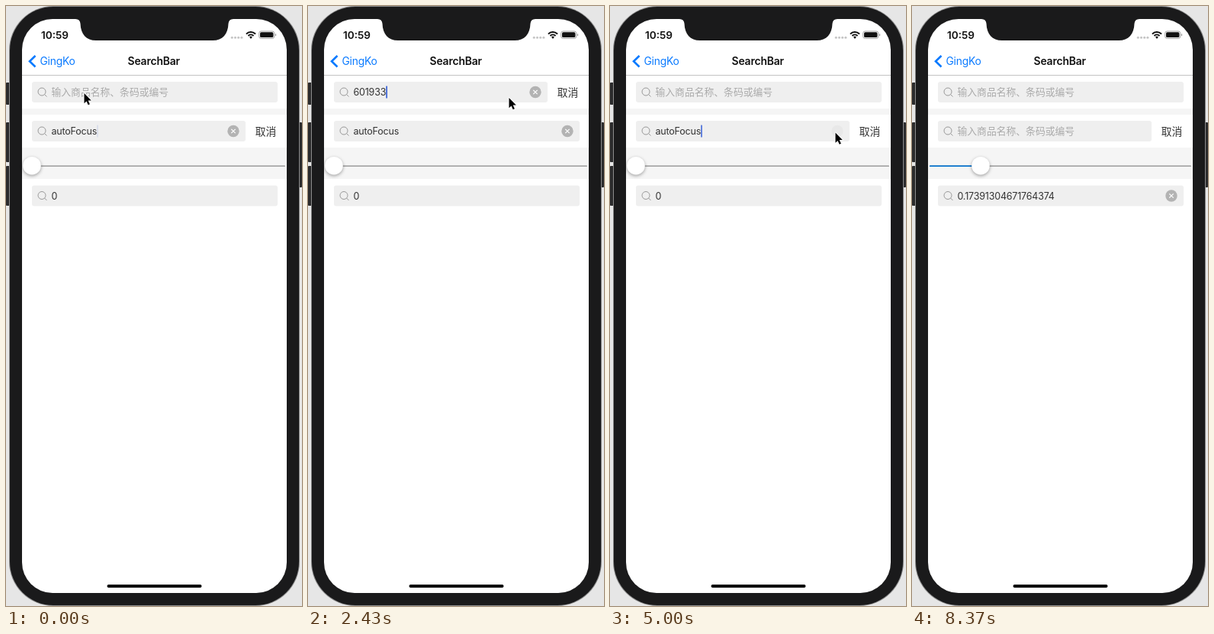
An HTML page with a canvas for the animation above (8430 ms loop, 388 by 784 pixels).

```html
<!DOCTYPE html>
<html lang="zh">
<head>
<meta charset="utf-8">
<style>
  html, body { margin: 0; height: 100%; overflow: hidden; background: #e6e6e6; }
  canvas { display: block; width: 388px; height: 784px; }
</style>
</head>
<body>
<canvas id="stage"></canvas>
<script>
const LOOP = 8430;
const BODY = '#1a1a1b', GREY = '#f5f5f5', FIELD = '#efefef', BLUE = '#0a7aff';
const LATIN = 'Inter, "Noto Sans CJK SC", "Noto Sans CJK", sans-serif';
const CJK = '"Noto Sans CJK SC", "Noto Sans CJK", sans-serif';
const HINT = '输入商品名称、条码或编号';

const canvas = document.getElementById('stage');
const g = canvas.getContext('2d');
const scale = window.devicePixelRatio || 1;
canvas.width = 388 * scale;
canvas.height = 784 * scale;

// Times and positions: [ms, value, ...]
const pointer = [
  [0, 102.5, 114], [900, 102.5, 114], [1170, 109.5, 115], [1970, 109.5, 115],
  [2430, 263.5, 120], [2780, 297, 113], [3000, 297, 113], [3550, 228.5, 175.5],
  [3970, 228.5, 175.5], [4300, 250, 166], [4800, 295.5, 165.5], [5250, 295.5, 165.5],
  [6000, 47.5, 212], [6250, 38, 211], [6400, 38, 211], [6700, 62, 211],
  [6970, 62, 211], [7500, 94, 211], [8000, 94, 211], [8330, -16, 225]
];
const drag = [[6400, 0], [6700, 24], [6970, 24], [7500, 56]];
const keyTimes = [900, 1340, 1470, 1680, 1800, 2030];
const FOCUS_1 = 130, CLEAR_1 = 2900, FOCUS_2 = 4300, CLEAR_2 = 5060;

function tween(keys, t) {
  const i = keys.findIndex(k => k[0] > t);
  if (i < 0) return keys[keys.length - 1].slice(1);
  if (i === 0) return keys[0].slice(1);
  const [a, b] = [keys[i - 1], keys[i]];
  const p = (1 - Math.cos(Math.PI * (t - a[0]) / (b[0] - a[0]))) / 2;
  return a.slice(1).map((v, n) => v + (b[n + 1] - v) * p);
}

function box(x, y, w, h, r, color) {
  g.fillStyle = color;
  g.beginPath();
  g.roundRect(x, y, w, h, r);
  g.fill();
}

function line(points, color, width, cap = 'butt') {
  g.strokeStyle = color;
  g.lineWidth = width;
  g.lineCap = cap;
  g.beginPath();
  points.forEach(([x, y]) => g.lineTo(x, y));
  g.stroke();
}

function disc(x, y, r, color) {
  g.fillStyle = color;
  g.beginPath();
  g.arc(x, y, r, 0, 7);
  g.fill();
}

function text(str, x, y, font, color, spacing = 0) {
  g.font = font;
  g.letterSpacing = spacing + 'px';
  g.fillStyle = color;
  g.fillText(str, x, y);
  return g.measureText(str).width;
}

function caretAlpha(t) {
  if (t > 870 && t < 2500) return 1;
  if (t < FOCUS_1) return 0.12;
  const phase = (t + 35) % 1005;
  return phase < 600 ? Math.max(0, 1 - phase / 100) : Math.min(1, (phase - 600) / 100);
}

function searchRow(mid, { value, focused, caret = 0, clear = 1 }) {
  const right = focused ? 314 : 356;
  box(21, mid - 21.5, 347, 43, 0, '#fff');
  box(34, mid - 13.5, right - 34, 27, 3, FIELD);
  g.strokeStyle = '#999';
  g.lineWidth = 1;
  g.beginPath();
  g.arc(47, mid - 0.5, 5, 0, 7);
  g.stroke();
  line([[50.5, mid + 3], [53.5, mid + 6]], '#999', 1);

  let width = 0;
  if (value) width = text(value, 59.5, mid + 4.5, '12.5px ' + LATIN, '#333', -0.2);
  else text(HINT, 59.5, mid + 4.8, '300 12.8px ' + CJK, '#aaa');

  if (focused) {
    g.globalAlpha = caret;
    box(59.5 + width, mid - 8, 1.8, 16, 0.5, '#4169d8');
    g.globalAlpha = 1;
    text('取消', 326.7, mid + 5.2, '13.8px ' + CJK, '#333');
  }
  if (value && value !== '0') {
    const x = right - 16;
    g.globalAlpha = clear;
    disc(x, mid, 7.7, '#b3b3b3');
    line([[x - 2.7, mid - 2.7], [x + 2.7, mid + 2.7]], '#fff', 1.2);
    line([[x + 2.7, mid - 2.7], [x - 2.7, mid + 2.7]], '#fff', 1.2);
    g.globalAlpha = 1;
  }
}

function slider(offset) {
  const x = 34 + offset;
  box(21, 185, 347, 41, 0, GREY);
  box(23, 208.3, 343, 1.8, 1, '#a8a8a8');
  if (offset) box(23, 208.3, offset + 11, 1.8, 1, '#0c78d2');
  g.save();
  g.shadowColor = 'rgba(0,0,0,.35)';
  g.shadowBlur = 4 * scale;
  g.shadowOffsetY = 1.5 * scale;
  disc(x, 208.7, 11.8, '#fff');
  g.restore();
}

function phone() {
  box(0, 0, 388, 784, 0, '#e6e6e6');
  [[100, 29], [152, 52], [209, 52]].forEach(([y, h]) => box(0, y, 8, h, 1, '#2b2b2c'));
  box(380, 152, 8, 85, 1, '#2b2b2c');
  box(4, 0, 381, 784, 58, '#8c8c8c');
  box(5, 1, 379, 782, 57, BODY);
  box(21, 17, 347, 750, 40, '#fff');

  g.fillStyle = BODY;
  g.beginPath();
  g.moveTo(91, 16);
  g.lineTo(91, 17);
  g.quadraticCurveTo(97, 17, 97.5, 23);
  g.bezierCurveTo(98, 37, 105, 45, 118, 45);
  g.lineTo(271, 45);
  g.bezierCurveTo(284, 45, 291, 37, 291.5, 23);
  g.quadraticCurveTo(292, 17, 298, 17);
  g.lineTo(298, 16);
  g.fill();
}

function statusBar() {
  text('10:59', 46, 42.7, '600 13.6px ' + LATIN, '#111');
  for (let i = 0; i < 4; i++) disc(296.3 + i * 4.2, 41.2, 1.5, '#c4c4c4');
  g.strokeStyle = '#111';
  g.lineCap = 'butt';
  g.lineWidth = 2;
  [4.8, 8.3].forEach(r => {
    g.beginPath();
    g.arc(321, 42.3, r, -Math.PI * 0.76, -Math.PI * 0.24);
    g.stroke();
  });
  g.fillStyle = '#111';
  g.beginPath();
  g.moveTo(321, 43);
  g.arc(321, 42.3, 2.6, -Math.PI * 0.76, -Math.PI * 0.24);
  g.fill();
  g.strokeStyle = '#999';
  g.lineWidth = 0.9;
  g.beginPath();
  g.roundRect(331.7, 33, 20, 9.4, 2.6);
  g.stroke();
  box(333, 34.3, 17.4, 6.8, 1.6, '#111');
  box(352.9, 36.2, 1.2, 3, 0.6, '#999');
}

function navBar() {
  line([[38.5, 65], [31, 72.2], [38.5, 79.5]], BLUE, 2.6);
  text('GingKo', 44.5, 77, '13.8px ' + LATIN, BLUE, -0.2);
  text('SearchBar', 159.5, 77, '600 13.9px ' + LATIN, '#111', -0.15);
  box(21, 90, 347, 1, 0, '#c4c4c4');
}

function arrow(x, y) {
  g.save();
  g.translate(x, y);
  g.beginPath();
  [[0, 0], [0, 13.2], [3, 10.4], [5.2, 15.3], [7.4, 14.3], [5.2, 9.6], [9.3, 9.6]]
    .forEach(([px, py]) => g.lineTo(px, py));
  g.closePath();
  g.lineJoin = 'round';
  g.lineWidth = 2;
  g.strokeStyle = '#fff';
  g.stroke();
  g.fillStyle = '#000';
  g.fill();
  g.restore();
}

function draw(t) {
  g.setTransform(scale, 0, 0, scale, 0, 0);
  const caret = caretAlpha(t);
  const firstFocused = t >= FOCUS_1 && t < FOCUS_2;
  const typed = t < CLEAR_1 ? '601933'.slice(0, keyTimes.filter(k => k <= t).length) : '';
  const offset = Math.round(tween(drag, t)[0]);

  phone();
  statusBar();
  navBar();
  box(21, 134, 347, 8, 0, GREY);
  searchRow(112.5, { value: typed, focused: firstFocused, caret });
  searchRow(163.5, {
    value: t < CLEAR_2 ? 'autoFocus' : '',
    focused: !firstFocused,
    caret,
    clear: t > 4930 ? 0.1 : 1
  });
  slider(offset);
  searchRow(248, { value: String(Math.fround(offset / 322)) });
  box(132.5, 756, 124, 4, 2, '#000');
  arrow(...tween(pointer, t));
}

function frame(now) {
  draw(now % LOOP);
  requestAnimationFrame(frame);
}
requestAnimationFrame(frame);
</script>
</body>
</html>
```
